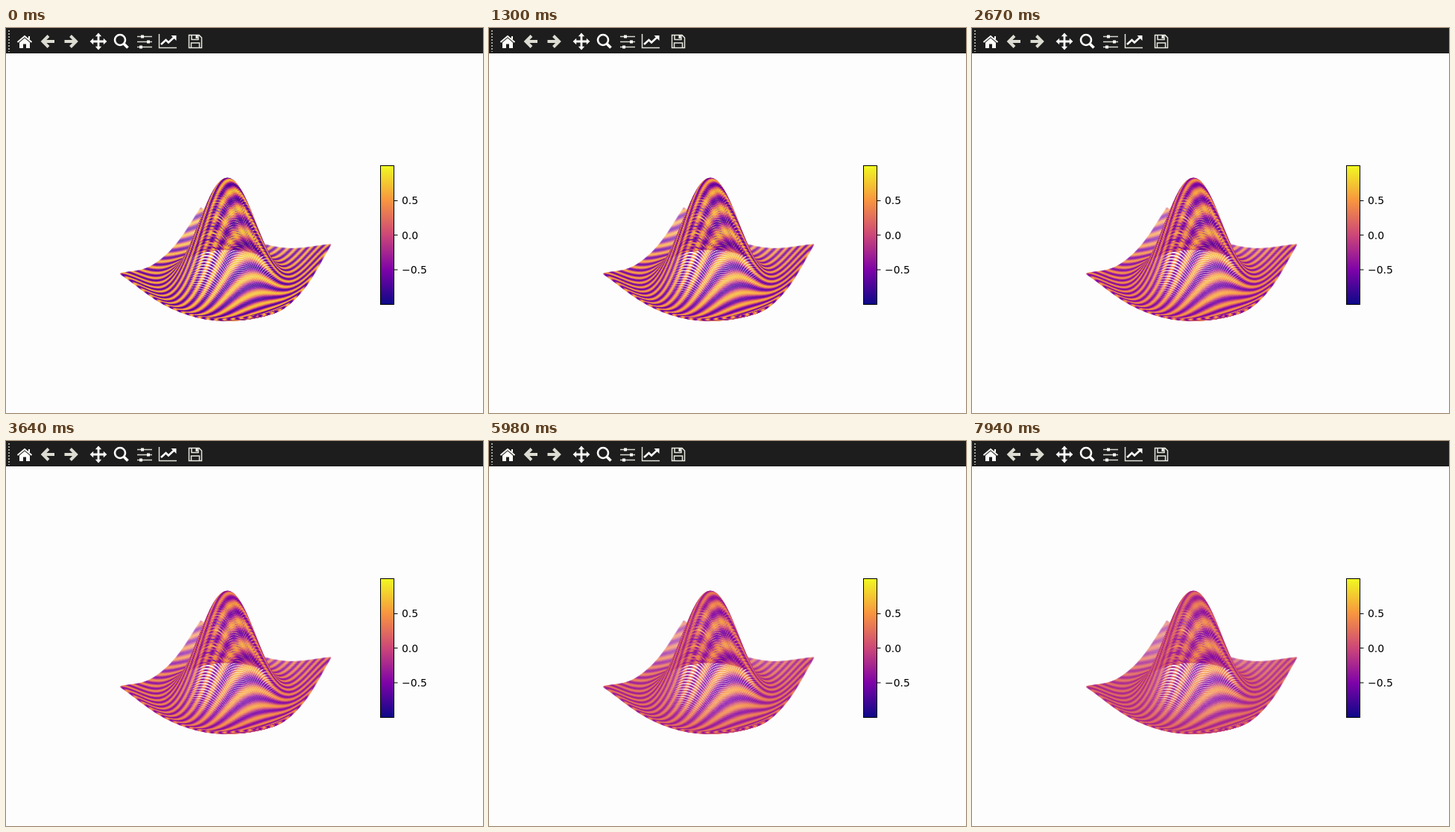
An HTML page with a canvas that plays this animation: 640x516 px, repeating every 8000 ms.

```html
<!DOCTYPE html>
<html lang="en">
<head>
<meta charset="utf-8">
<title>Waves fading on a surface</title>
<style>
  html, body { margin: 0; width: 100%; height: 100%; overflow: hidden; background: #fdfdfd; }
  canvas, svg { position: absolute; left: 0; top: 0; width: 640px; height: 516px; }
  text { font: 13.9px "DejaVu Sans", sans-serif; }
</style>
</head>
<body>
<canvas id="plot" width="640" height="516"></canvas>
<svg viewBox="0 0 640 516">
  <defs>
    <linearGradient id="ramp" x1="0" y1="1" x2="0" y2="0"></linearGradient>
    <path id="arrow" d="M9 0H-6M1-7.5L-6.5 0L1 7.5" fill="none" stroke="#dcdcd2" stroke-width="4"/>
    <path id="tip" d="M-4.2-6.8L0-11.4L4.2-6.8H1.4V0H-1.4V-6.8Z"/>
  </defs>

  <!-- toolbar -->
  <rect width="640" height="34" fill="#1d1d1d"/>
  <path d="M4 3V32" stroke="#a4a49c" stroke-width="2" stroke-dasharray="2 2"/>
  <g fill="#fdfdfa">
    <path d="M25 13.5L32 19.5V27H27V21.5H23V27H18V19.5Z"/>
    <path d="M15.5 19L25 11L34.5 19M31 11V15" fill="none" stroke="#fdfdfa" stroke-width="2"/>
    <use href="#arrow" x="56" y="18"/>
    <use href="#arrow" transform="translate(87.500 18) scale(-1 1)"/>
    <g transform="translate(124 18)">
      <use href="#tip"/><use href="#tip" transform="rotate(90)"/>
      <use href="#tip" transform="rotate(180)"/><use href="#tip" transform="rotate(270)"/>
    </g>
    <g fill="none" stroke="#fdfdfa">
      <circle cx="153" cy="16" r="7" stroke-width="2.600"/>
      <path d="M158 21L163.500 26.500" stroke-width="3.800"/>
      <path d="M176 11.500H196M176 18.500H196M176 25.500H196" stroke="#d8d8d0" stroke-width="1.500"/>
      <path d="M205.500 8V26.500H229" stroke="#e2e2da" stroke-width="1.500"/>
      <path d="M208 22L214.500 16L218 19.500L226 12" stroke-width="2.600"/>
      <path d="M245.500 9.500H259L262.500 13V26.500H245.500ZM249 9.500V15.500H258V9.500M248.500 26.500V20H259.500V26.500" stroke="#e8e8e0" stroke-width="1.500"/>
    </g>
    <path d="M181 9.500h4v4h-4zM189 16.500h4v4h-4zM179 23.500h4v4h-4z"/>
    <path d="M221.500 10H228.500V17Z"/>
    <path d="M254.500 10H257V14H254.500Z"/>
  </g>

  <!-- colour bar -->
  <rect x="502.500" y="184.500" width="18" height="186" fill="url(#ramp)" stroke="#000"/>
  <path d="M521 231.500H525.500M521 277.500H525.500M521 324H525.500" stroke="#000" stroke-width="1.100"/>
  <text x="531" y="236">0.5</text>
  <text x="531" y="282.500">0.0</text>
  <text x="531" y="328.800">−0.5</text>
</svg>
<script>
const LOOP = 8000, STEP = 200, GRID = 140, RADIUS = 1.35;
const REACH = 2;                 // the surface covers -REACH..REACH in x and y
const HALF_XY = 0.5195, HALF_Z = 0.392, LOW = -2 * Math.exp(-1.5);
const stops = [[13, 8, 135], [126, 3, 168], [204, 71, 120], [248, 149, 64], [240, 249, 33]];
const ctx = document.getElementById("plot").getContext("2d");

function colourAt(u) {
  const s = Math.max(0, Math.min(0.9999, u)) * (stops.length - 1), i = Math.floor(s);
  const mix = stops[i].map((c, k) => Math.round(c + (stops[i + 1][k] - c) * (s - i)));
  return `rgb(${mix})`;
}
const palette = Array.from({ length: 256 }, (_, i) => colourAt(i / 255));

document.getElementById("ramp").innerHTML = stops.map((c, i) =>
  `<stop offset="${i / (stops.length - 1)}" stop-color="rgb(${c})"/>`).join("");

// Perspective view from azimuth -60 and elevation 30 degrees.
function project(x, y, z) {
  const depth = 10 - (0.433 * x - 0.75 * y + 0.5 * z);
  const scale = 1997.8 / depth;
  return {
    depth,
    px: 297 + (0.866 * x + 0.5 * y) * scale,
    py: 272.2 - (-0.25 * x + 0.433 * y + 0.866 * z) * scale
  };
}

function makePoint(i, j) {
  const x = (2 * i / (GRID - 1) - 1) * REACH;
  const y = (2 * j / (GRID - 1) - 1) * REACH;
  const rr = x * x + y * y, bell = Math.exp(-rr / 2);
  const height = (1 - rr) * bell;
  const z = ((height - LOW) / (1 - LOW) * 2 - 1) * HALF_Z;
  // Where the surface is steep across the stripes, they fade more slowly.
  const slope = (rr - 3) * bell;
  const across = slope * (0.866 * x - 0.5 * y);
  return {
    ...project(x / REACH * HALF_XY, y / REACH * HALF_XY, z),
    wave: Math.sin(26 * x - 15 * y),
    rate: 1 - across * across / (1 + slope * slope * rr)
  };
}

const points = [];
for (let i = 0; i < GRID; i++)
  for (let j = 0; j < GRID; j++) points.push(makePoint(i, j));
points.sort((a, b) => b.depth - a.depth);
const far = points[0].depth, near = points[points.length - 1].depth;
for (const p of points) p.alpha = 1 - 0.7 * (p.depth - near) / (far - near);

function draw(time) {
  ctx.clearRect(0, 0, 640, 516);
  for (const p of points) {
    const value = 0.75 * p.wave * Math.exp(-p.rate * time / LOOP);
    ctx.globalAlpha = p.alpha;
    ctx.fillStyle = palette[Math.round((value + 1) * 127.5)];
    ctx.beginPath();
    ctx.arc(p.px, p.py, RADIUS, 0, 2 * Math.PI);
    ctx.fill();
  }
}

let shown = -1;
function tick() {
  const step = Math.floor(performance.now() % LOOP / STEP);
  if (step !== shown) draw((shown = step) * STEP);
  requestAnimationFrame(tick);
}
tick();
</script>
</body>
</html>
```
